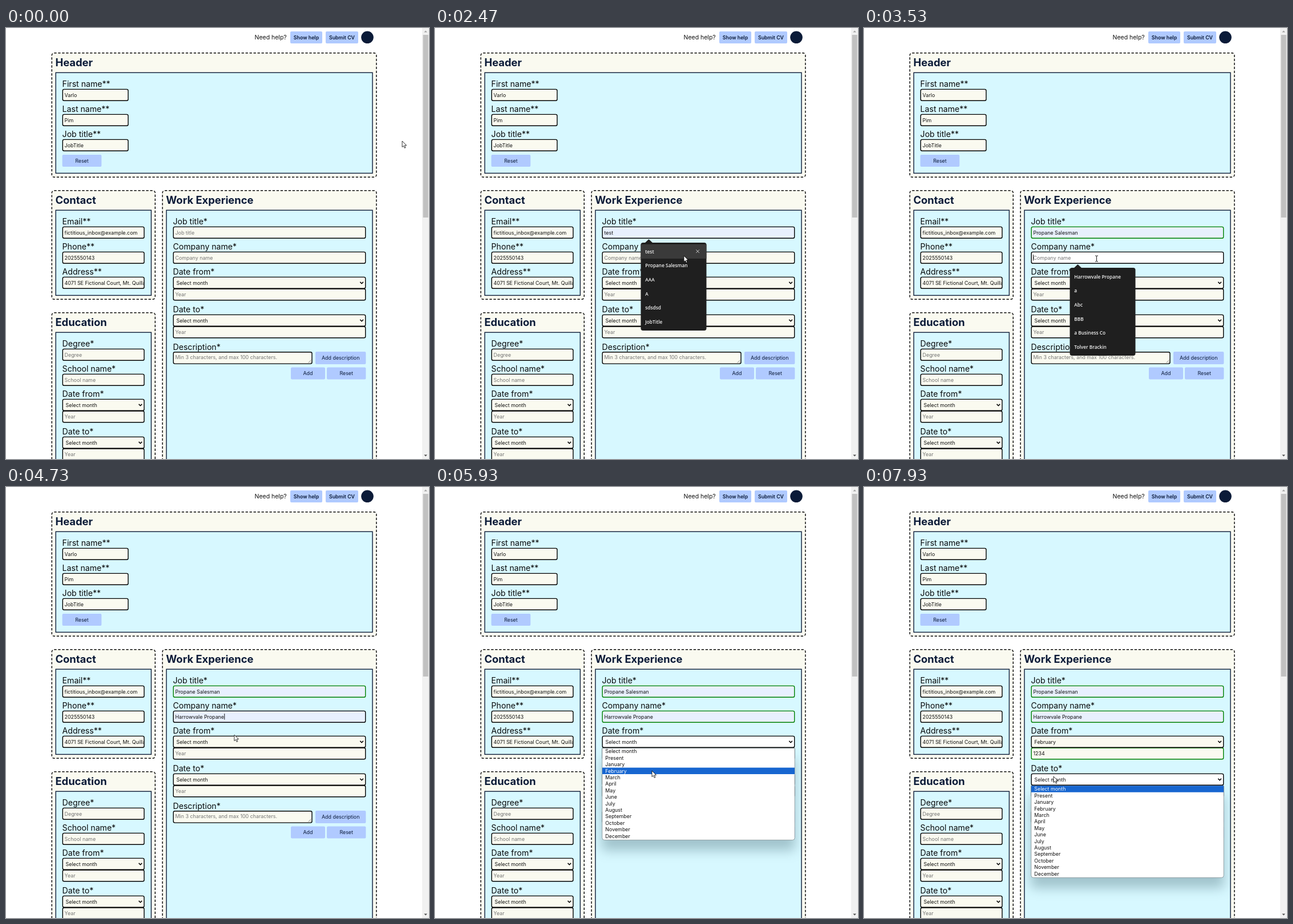
An HTML page for the animation above (8000 ms loop, 741 by 755 pixels).

```html
<!DOCTYPE html>
<html lang="en">
<head>
<meta charset="utf-8">
<title>CV form</title>
<style>
  html, body { margin: 0; width: 100%; height: 100%; overflow: hidden; background: #fff; }
  svg { display: block; width: 741px; height: 755px; cursor: default; user-select: none; }
  text { font-family: Inter, Roboto, sans-serif; font-size: 8.9px; fill: #111; white-space: pre; }
  .title { font-size: 18.4px; font-weight: 700; fill: #0b1b38; }
  .label { font-size: 14.1px; fill: #0a0a0a; }
  .help { font-size: 10.5px; }
  .hint { fill: #757575; }
  .btn { fill: #0b1b38; text-anchor: middle; }
  .strong { font-weight: 600; font-size: 8.8px; }
  .option { font-family: "Open Sans", "Noto Sans", sans-serif; font-size: 8.3px; font-weight: 600; fill: #f1f1f1; }
  .list { filter: drop-shadow(0 18px 10px rgba(0, 40, 50, .25)); }
</style>
</head>
<body>
<svg id="stage" viewBox="0 0 741 755"></svg>
<script>
const LOOP = 8000, FPS = 15;
const CREAM = '#fafaf0', NAVY = '#0b1b38', BLUE = '#e8f0fe', GREEN = '#008000';
// Column edges of the form fields
const LEFT = 98.6, LEFT_END = 242.7, RIGHT = 292.5, RIGHT_END = 630.4;
const stage = document.getElementById('stage');

function el(tag, attrs, parent = stage) {
  const node = document.createElementNS('http://www.w3.org/2000/svg', tag);
  for (const key in attrs) node.setAttribute(key, attrs[key]);
  return parent.appendChild(node);
}
function text(x, y, str, cls = '', parent = stage) {
  const node = el('text', { x, y, class: cls }, parent);
  node.textContent = str;
  return node;
}
// Box given by its outer edges, with the stroke drawn inside
function box(x1, y1, x2, y2, attrs, parent) {
  const w = attrs.stroke ? 1.4 : 0;
  return el('rect', {
    x: x1 + w / 2, y: y1 + w / 2, width: x2 - x1 - w, height: y2 - y1 - w,
    'stroke-width': w, ...attrs
  }, parent);
}
function show(node, on) { node.style.display = on ? '' : 'none'; }

function panel(x1, y1, x2, y2, title) {
  const frame = box(x1, y1, x2, y2, { fill: CREAM, stroke: '#000', rx: 4 });
  // Fit a whole number of dashes around the frame
  const length = frame.getTotalLength(), period = length / Math.round(length / 7);
  frame.setAttribute('stroke-dasharray', `4.2 ${period - 4.2}`);
  box(x1 + 6.9, y1 + 34.5, x2 - 6.9, y2 - 6.9, { fill: '#d7f8ff', stroke: NAVY });
  text(x1 + 6.8, y1 + 24.3, title, 'title');
}
function button(x1, y1, x2, y2, str, cls = '') {
  box(x1, y1, x2, y2, { fill: '#b0caff', rx: 2 });
  text((x1 + x2) / 2, (y1 + y2) / 2 + 3.2, str, 'btn ' + cls);
}

const styles = {
  idle: [CREAM, '#000'],
  focus: ['#fff', '#000'],
  auto: [BLUE, '#000'],
  done: [BLUE, GREEN],
  valid: [CREAM, GREEN]
};
function field(x1, y1, x2, value, hint = '', isSelect = false) {
  const frame = box(x1, y1, x2, y1 + 21.2, { fill: CREAM, stroke: '#000', rx: 2.5 });
  const x = x1 + (isSelect ? 6 : 4);
  const label = text(x, y1 + 14, '');
  if (isSelect) {
    el('path', { d: `M${x2 - 10.1} ${y1 + 9.2}l2.8 2.8 2.8-2.8`, fill: 'none', stroke: '#000', 'stroke-width': 1.5 });
  }
  function set(str, style) {
    label.textContent = str || hint;
    label.setAttribute('class', str ? '' : 'hint');
    frame.setAttribute('fill', styles[style][0]);
    frame.setAttribute('stroke', styles[style][1]);
  }
  set(value, 'idle');
  return { set, label, x, y: y1 };
}
// Field with its label; y is the label's baseline
function labelled(x1, y, x2, name, value, hint) {
  text(x1, y, name, 'label');
  return field(x1, y + 3.7, x2, value, hint);
}
function dateFields(x1, y, x2, name) {
  text(x1, y, name, 'label');
  const year = field(x1, y + 24.3, x2, '', 'Year');
  const month = field(x1, y + 3.7, x2, 'Select month', '', true);
  return { month, year };
}

// Top bar
text(435.5, 19.8, 'Need help?', 'help');
button(498, 6, 554, 27, 'Show help', 'strong');
button(560, 6, 617, 27, 'Submit CV', 'strong');
el('circle', { cx: 633, cy: 16.3, r: 10.8, fill: NAVY });

// Header
panel(79.6, 43, 649.6, 262, 'Header');
[['First name**', 'Varlo'], ['Last name**', 'Pim'], ['Job title**', 'JobTitle']].forEach(([name, value], i) => {
  labelled(LEFT, 103 + i * 44, 214.7, name, value);
});
button(98.6, 222, 167.3, 243, 'Reset');

// Contact
panel(79.6, 284, 262, 476, 'Contact');
[['Email**', 'fictitious_inbox@example.com'], ['Phone**', '2025550143'],
 ['Address**', '4071 SE Fictional Court, Mt. Quilla']].forEach(([name, value], i) => {
  const { label } = labelled(LEFT, 344 + i * 44, LEFT_END, name, value);
  label.setAttribute('clip-path', 'url(#inside)');
});
el('rect', { x: 100, y: 340, width: 141.3, height: 120 }, el('clipPath', { id: 'inside' }));

// Education
panel(79.6, 498, 262, 900, 'Education');
['Degree', 'School name'].forEach((name, i) => labelled(LEFT, 558 + i * 44, LEFT_END, name + '*', '', name));
['Date from*', 'Date to*'].forEach((name, i) => dateFields(LEFT, 646 + i * 66, LEFT_END, name));

// Work experience
panel(273.4, 284, 649.6, 900, 'Work Experience');
const job = labelled(RIGHT, 344, RIGHT_END, 'Job title*', '', 'Job title');
const company = labelled(RIGHT, 388, RIGHT_END, 'Company name*', '', 'Company name');
const { month: monthFrom, year: yearFrom } = dateFields(RIGHT, 432, RIGHT_END, 'Date from*');
const { month: monthTo } = dateFields(RIGHT, 498, RIGHT_END, 'Date to*');
text(RIGHT, 564, 'Description*', 'label');
box(RIGHT, 567, 536.7, 588.8, { fill: CREAM, stroke: '#000', rx: 2.5 });
text(296.5, 579.6, 'Min 3 characters, and max 100 characters.', 'hint');
el('path', { d: 'M529.5 586.5l5-5M532.5 586.5l2-2', stroke: '#777', 'stroke-width': .8 });
button(542, 567, RIGHT_END, 589, 'Add description');
button(499, 594.5, 559, 615.5, 'Add');
button(562, 594.5, RIGHT_END, 615.5, 'Reset');
const spinner = el('path', { d: 'M621 465.8l2.8-3.4 2.8 3.4zM621 468l2.8 3.4 2.8-3.4z', fill: '#555' });
const caret = el('rect', { width: .9, height: 10.5, fill: '#000' });

// Scrollbar
box(729, 0, 741, 755, { fill: '#f1f1f1' });
box(730.5, 12, 739.7, 332, { fill: '#c1c1c1' });
el('path', { d: 'M732.3 7.6l2.8-3 2.8 3z', fill: '#a3a3a3' });
el('path', { d: 'M732.3 747.4l2.8 3 2.8-3z', fill: '#505050' });

// Dark autofill popup
function suggestions(top, names) {
  const group = el('g', {});
  const rowH = 24.7;
  el('path', { d: `M367.5 ${top + .5}l7-6.5 7 6.5z`, fill: '#1f1f1f' }, group);
  box(360.5, top, 475.5, top + 154, { fill: '#1f1f1f', rx: 4 }, group);
  const mark = el('g', {}, group);
  box(360.5, top + 3, 475.5, top + 28, { fill: '#3a3a3a' }, mark);
  el('path', { d: `M457.4 ${top + 12.4}l5.6 5.6m0-5.6l-5.6 5.6`, stroke: '#ddd', 'stroke-width': .9 }, mark);
  names.forEach((name, i) => text(368.3, top + 18.5 + i * rowH, name, 'option', group));
  return function update(on, pos) {
    show(group, on);
    const row = on && pos.x < 475 && pos.y > top + 3 ? Math.floor((pos.y - top - 3) / rowH) : -1;
    show(mark, row >= 0);
    mark.setAttribute('transform', `translate(0 ${Math.max(row, 0) * rowH})`);
    return names[row];
  };
}
const jobMenu = suggestions(376, ['test', 'Propane Salesman', 'AAA', 'A', 'sdsdsd', 'JobTitle']);
const companyMenu = suggestions(420, ['Harrowvale Propane', 'a', 'Abc', 'BBB', 'a Business Co', 'Tolver Brackin']);

// White month list
const months = ('Select month,Present,January,February,March,April,May,June,July,' +
  'August,September,October,November,December').split(',');
function monthList(top) {
  const group = el('g', { class: 'list' });
  const rowH = 11.4;
  el('path', {
    d: `M292.8 ${top}H630.2V${top + 157}q0 4-4 4H296.8q-4 0-4-4z`,
    fill: '#fff', stroke: '#7d8c92', 'stroke-width': .8
  }, group);
  const mark = box(293, top, 630, top + rowH, { fill: '#1766d0' }, group);
  const rows = months.map((name, i) => text(298.3, top + 9 + i * rowH, name, '', group));
  return function update(on, pos) {
    show(group, on);
    if (!on) return;
    const row = Math.max(0, Math.floor((pos.y - top) / rowH));
    mark.setAttribute('y', top + row * rowH);
    rows.forEach((node, i) => { node.style.fill = i === row ? '#fff' : ''; });
  };
}
const fromList = monthList(457.4);
const toList = monthList(523.3);

// Pointer
const arrow = el('path', {
  d: 'M0 0V10.6L2.5 8.4 4.2 12.3 6 11.5 4.3 7.7H7.6Z',
  fill: '#fff', stroke: '#000', 'stroke-width': .8, 'stroke-linejoin': 'round'
});
const beam = el('path', { d: 'M-2.5-5h2l.5.5.5-.5h2M0-4.5v9M-2.5 5h2l.5-.5.5.5h2', fill: 'none', stroke: '#000', 'stroke-width': .9 });

// time, x, y
const path = [
  [0, 694, 198], [70, 694, 198], [200, 704, 222], [340, 704, 222], [733, 506, 344],
  [870, 506, 344], [1200, 506, 355], [2130, 506, 355], [2467, 436, 399], [2933, 410, 415],
  [3200, 410, 415], [3533, 407.5, 404], [3740, 407.5, 404], [4067, 400, 434], [4730, 400, 434],
  [4933, 397, 440], [5140, 397, 440], [5267, 391, 449], [5470, 391, 449], [5933, 380, 497],
  [6400, 380, 497], [6867, 344.7, 476.5], [7400, 344.7, 476.5], [7467, 338, 522],
  [7610, 338, 522], [7800, 332, 507], [LOOP, 332, 507]
];
function pointerAt(t) {
  const i = path.findIndex(p => p[0] > t);
  const [t0, x0, y0] = path[i - 1], [t1, x1, y1] = path[i];
  const k = (t - t0) / (t1 - t0);
  return { x: x0 + (x1 - x0) * k, y: y0 + (y1 - y0) * k };
}

// Blinking caret at the end of the typed text
function placeCaret(target, since, typed, t) {
  show(caret, Math.floor((t - since) / 500) % 2 === 0);
  caret.setAttribute('x', target.x + (typed ? target.label.getComputedTextLength() + .3 : -.3));
  caret.setAttribute('y', target.y + 5.3);
}

function draw(now) {
  const step = Math.floor((now % LOOP + 4) * FPS / 1000);
  const t = Math.min(step * 1000 / FPS + .5, LOOP - 1);
  const within = (a, b) => t >= a && t < b;
  const pos = pointerAt(t);

  const jobOpen = within(1660, 3200), companyOpen = within(3530, 4730);
  const jobPick = jobMenu(jobOpen, pos), companyPick = companyMenu(companyOpen, pos);
  fromList(within(5460, 6330), pos);
  toList(t >= 7860, pos);

  if (t < 3200) job.set(jobPick, jobPick ? 'auto' : jobOpen ? 'focus' : 'idle');
  else job.set('Propane Salesman', t < 3530 ? 'auto' : 'done');

  if (t < 4730) company.set(companyPick, companyPick ? 'auto' : companyOpen ? 'focus' : 'idle');
  else company.set('Harrowvale Propane', t < 5400 ? 'auto' : 'done');

  monthFrom.set(t < 6330 ? 'Select month' : 'February', within(5400, 6800) ? 'focus' : 'idle');
  const typed = [7060, 7200, 7330, 7400].filter(key => t >= key).length;
  yearFrom.set('1234'.slice(0, typed), t < 6800 ? 'idle' : t < 7800 ? 'focus' : 'valid');
  monthTo.set('Select month', t < 7800 ? 'idle' : 'focus');
  show(spinner, within(6730, 7800));

  if (jobOpen) placeCaret(job, 1667, false, t);
  else if (within(3200, 3530)) placeCaret(job, 3200, true, t);
  else if (companyOpen) placeCaret(company, 3533, false, t);
  else if (within(4730, 5400)) placeCaret(company, 4700, true, t);
  else if (within(6800, 7800)) placeCaret(yearFrom, typed ? Math.min(t, 7400) : 6800, typed > 0, t);
  else show(caret, false);

  const isBeam = within(930, 2260) || within(3460, 3860) || within(6730, 7460);
  show(arrow, !isBeam);
  show(beam, isBeam);
  (isBeam ? beam : arrow).setAttribute('transform', `translate(${pos.x.toFixed(1)} ${pos.y.toFixed(1)})`);
}
function tick() {
  draw(performance.now());
  requestAnimationFrame(tick);
}
tick();
</script>
</body>
</html>
```
